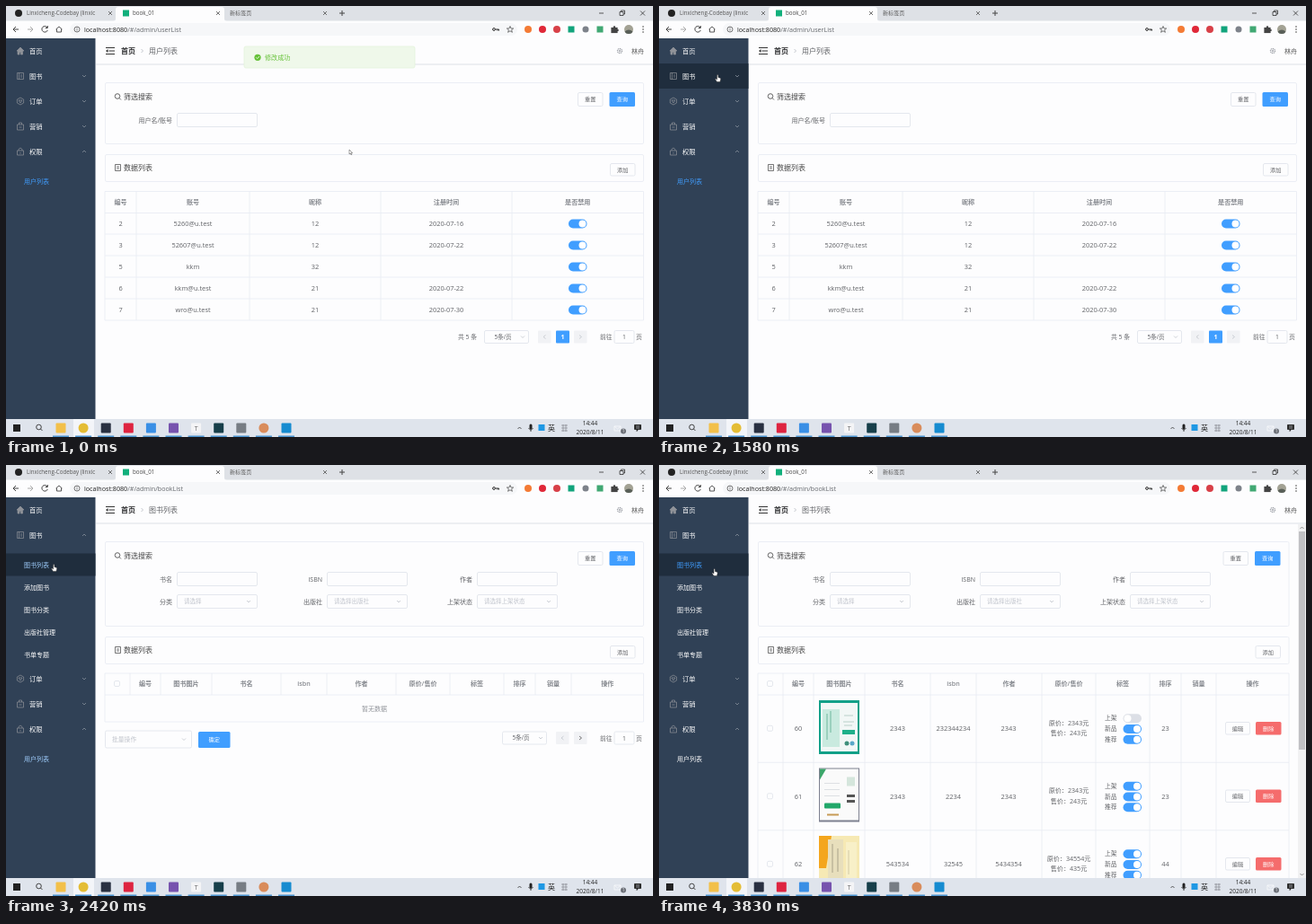
These frames come from a looping animation (720 px wide and 480 px high, 3910 ms). An HTML page:

```html
<!DOCTYPE html>
<html lang="zh">
<head>
<meta charset="utf-8">
<title>用户列表</title>
<style>
html, body { margin: 0; width: 100%; height: 100%; overflow: hidden; background: #fdfdfe; }
svg { display: block; width: 720px; height: 480px; }
text { font-family: "Open Sans", "Noto Sans CJK SC", "Noto Sans CJK", sans-serif; white-space: pre; }
</style>
</head>
<body>
<svg id="stage" viewBox="0 0 720 480"></svg>
<script>
const LOOP = 3910, PAGE = '#fdfdfe', BAR = '#dee1e6', SIDE = '#304156', HOVER = '#1f2d3d';
const BLUE = '#409eff', LINE = '#e8ebf3', EDGE = '#dfe2ea', INK = '#606266', HINT = '#c0c4cc';

// Drawing helpers; text is placed by its vertical centre.
const rect = (x, y, w, h, fill, extra = '') =>
  `<rect x="${x}" y="${y}" width="${w}" height="${h}" fill="${fill}" ${extra}/>`;
const disc = (x, y, r, fill, extra = '') => `<circle cx="${x}" cy="${y}" r="${r}" fill="${fill}" ${extra}/>`;
const path = (d, stroke = INK, w = 0.8, fill = 'none') =>
  `<path d="${d}" fill="${fill}" stroke="${stroke}" stroke-width="${w}"/>`;
const text = (x, y, s, size = 7, fill = INK, anchor = 'start', extra = '') =>
  `<text x="${x}" y="${y + size * 0.37}" font-size="${size}" fill="${fill}" text-anchor="${anchor}" ${extra}>${s}</text>`;
const mid = (x, y, s, size, fill, extra) => text(x, y, s, size, fill, 'middle', extra);
const group = (id, body, extra = '') => `<g id="${id}" ${extra}>${body}</g>`;
const frame = (x, y, w, h, stroke = EDGE) =>
  rect(x + 0.5, y + 0.5, w - 1, h - 1, 'none', `rx="1.5" stroke="${stroke}" stroke-width=".8"`);
const hline = (x1, x2, y) => path(`M${x1} ${y}H${x2}`, LINE);
const chevron = (x, y, up, color = HINT) => {
  const d = up ? -1 : 1;
  return path(`M${x - 2} ${y - d}l2 ${2 * d}l2 ${-2 * d}`, color);
};
const button = (x, y, w, h, label, fill) =>
  (fill ? rect(x, y, w, h, fill, 'rx="1.5"') : frame(x, y, w, h)) +
  mid(x + w / 2, y + h / 2, label, 6.2, fill ? '#fff' : INK);
const toggle = (x, y, on = true) => rect(x, y - 5, 20.5, 10, on ? BLUE : '#dcdfe6', 'rx="5"') +
  disc(on ? x + 15.5 : x + 5, y, 4, '#fff');
const glass = (x, y, r, color, w = 0.9) =>
  disc(x, y, r, 'none', `stroke="${color}" stroke-width="${w}"`) + path(`M${x + r * 0.7} ${y + r * 0.7}l2 2`, color, w);
const cross = x => path(`M${x - 2} 6l4 4m0 -4l-4 4`, '#555', 0.8);

function browser() {
  const tools = path('M14 26H8m3 -3l-3 3l3 3', '#444', 1) + path('M24 26h6m-3 -3l3 3l-3 3', '#aaa', 1) +
    path('M46 24a3.3 3.3 0 1 0 .3 3M46.300 22v2.500h-2.500', '#444', 1) +
    path('M55.500 26l3.500 -3l3.500 3M56.500 25.500v3.500h5v-3.500', '#444', 0.9) +
    disc(79, 26, 3, 'none', 'stroke="#555" stroke-width=".8"') + path('M79 25.500v2M79 24v.8', '#555', 0.8) +
    disc(543, 26, 1.4, 'none', 'stroke="#333"') + path('M544.500 26h4v1.500m-1.500 -1.500v1.500', '#333', 1) +
    path('M561 22.500l1 2.500h2.700l-2.100 1.700l.8 2.600l-2.400 -1.500l-2.400 1.500l.8 -2.600l-2.100 -1.700h2.700z', '#444', 0.7);
  const addons = disc(581, 26, 4, '#f47b35') + disc(597, 26, 4, '#e02838') + disc(613, 26, 4, '#d84048') +
    rect(625.5, 22.5, 7, 7, '#12a47c') + disc(645, 26, 3.5, '#7d828a') + rect(657.5, 22.5, 7, 7, '#41a873') +
    path('M673.500 24h2.500v-1.500h2v1.500h2.500v2h1v2h-1v2h-7z', '#444', 0.2, '#444') +
    disc(693, 26, 5, '#a3a294') + path('M688.500 28.500q4.500 -4 9 0q-1.500 3 -4.500 2.500q-3 .5 -4.500 -2.500', 'none', 0, '#595f58') +
    [23, 26, 29].map(y => disc(709, y, 0.8, '#444')).join('');
  return rect(0, 0, 720, 17, BAR) + path('M119 17q3 0 3 -3v-10q0 -3 3 -3h115q3 0 3 3v10q0 3 3 3z', 'none', 0, PAGE) +
    rect(0, 16.5, 720, 19.5, PAGE) + rect(71, 19, 498, 14, '#f6f7f9', 'rx="7"') +
    disc(14, 8, 4, '#222') + text(23, 8, 'Linxicheng-Codebay (linxic', 6.2, '#555') + cross(116) +
    rect(130, 4.5, 7, 7, '#12b07c') + text(141, 8, 'book_01', 6.2, '#444') + cross(236) +
    text(249, 8, '新标签页', 6.1, '#555') + cross(355) + path('M374 5v6M371 8h6', '#444', 1) +
    path('M660 8h5M706 5.500l5 5m0 -5l-5 5M683 6.500h4v4h-4zM684.500 6.500v-1.500h4v4h-1.500', '#333', 0.8) +
    tools + addons + text(87, 26, 'localhost:8080<tspan id="route" fill="#65686d"></tspan>', 7.15, '#222');
}

const menuIcons = [
  'M12 50l4 -4l4 4h-1.500v4h-2v-2.500h-1.500v2.500h-2v-4z',
  'M12.500 74.500h7v7h-7zM14.500 74.500v7M16 77h2M16 79h2',
  'M16 102l3.600 2v4l-3.600 2l-3.600 -2v-4zM14 105h4l-2 3z',
  'M12.500 132h7v6h-7zM14.500 132v-2h3v2M14.500 135h3',
  'M12.500 161h7v5h-7zM14 161v-1.500q2 -3 4 0v1.500M16 163v1.500'
];
const menuRow = (label, i, open) => {
  const y = 50 + i * 28;
  return path(menuIcons[i], '#909399', 0.7, i ? 'none' : '#909399') +
    text(26, y, label, 7.3, '#fff', 'start', 'font-weight="500"') +
    (i ? group('arrow' + i, chevron(87, y, open, '#87909c')) : '');
};

function sidebar() {
  const sub = ['图书列表', '添加图书', '图书分类', '出版社管理', '书单专题'].map((s, i) =>
    text(20, 111 + 25 * i, s, 7, '#fff', 'start', i ? '' : 'id="bookItem"')).join('');
  return rect(0, 36, 99.5, 424, SIDE) + rect(0, 64, 99.5, 28, HOVER, 'id="hoverTop"') +
    menuRow('首页', 0) + menuRow('图书', 1) +
    `<clipPath id="fold"><rect id="foldBox" x="0" y="92" width="100" height="0"/></clipPath>` +
    group('submenu', rect(0, 98.5, 99.5, 25, HOVER, 'id="hoverSub"') + sub, 'clip-path="url(#fold)"') +
    group('lower', menuRow('订单', 2) + menuRow('营销', 3) + menuRow('权限', 4, true) +
      text(20, 195, '用户列表', 7, BLUE, 'start', 'id="userItem"'));
}

function header() {
  return rect(100, 64.5, 620, 1, '#dde1e8') +
    path('M111 46.500h10M114.500 50h6.500M111 53.500h10', '#333', 1.2) + path('M113.500 48v4l-2.500 -2z', 'none', 0, '#333') +
    text(128, 50, '首页', 8, '#303133', 'start', 'font-weight="700"') + path('M150.500 48l2 2l-2 2', '#b4b8c0') +
    text(159, 50, '', 8, INK, 'start', 'id="crumb"') +
    disc(683, 50, 2.5, 'none', 'stroke="#a3a6ad" stroke-width="1.400" stroke-dasharray="1.3 .6"') + disc(683, 50, 1, '#a3a6ad') +
    text(696, 50, '林舟', 7, '#555');
}

// Search card, list card and their buttons; r is the right edge.
const cards = (r, bottom) => frame(110, 85, r - 110, bottom - 85, LINE) + glass(124, 100.5, 2.8, '#555') +
  text(131, 101.5, '筛选搜索', 8, '#444') + button(r - 74, 96, 28.5, 16, '重置') + button(r - 38.5, 96, 28.5, 16, '查询', BLUE) +
  frame(110, bottom + 11, r - 110, 31, LINE) + path(`M121.500 ${bottom + 22.5}h6v7h-6zM123 ${bottom + 25}h3M123 ${bottom + 27}h3`, '#555') +
  text(131, bottom + 26.5, '数据列表', 8, '#444') + button(r - 38, bottom + 21, 28.5, 14.5, '添加');

const field = (x, y, label, hint) => text(x - 5, y, label, 7, INK, 'end') + frame(x, y - 8, 90, 16) +
  (hint ? text(x + 8, y, hint, 6.5, HINT) + chevron(x + 80, y) : '');

const grid = (edges, y, bottom, labels) => {
  const last = edges[edges.length - 1];
  return hline(110, last, y) + hline(110, last, y + 24) +
    edges.map(x => path(`M${x} ${y}V${bottom}`, LINE)).join('') +
    labels.map((s, i) => s && mid((edges[i] + edges[i + 1]) / 2, y + 11.5, s, 7.1, '#85888e', 'font-weight="600"')).join('');
};

const pager = (y, selX, page) => frame(selX, y - 7.5, 50, 15) + mid(selX + 21, y, '5条/页', 6.5) + chevron(selX + 43, y) +
  (page ? text(503, y, '共 5 条', 6.8) + rect(612, y - 7, 15, 14, BLUE, 'rx="1"') + mid(619.5, y, '1', 7, '#fff', 'font-weight="700"') : '') +
  [page ? 592 : 612, 632].map((x, i) => rect(x, y - 7, 14.5, 14, '#f1f2f5', 'rx="1"') +
    path(i ? `M${x + 6} ${y - 2}l2.500 2l-2.500 2` : `M${x + 8.5} ${y - 2}l-2.500 2l2.500 2`, i && !page ? '#555' : HINT)).join('') +
  text(661, y, '前往', 6.8) + frame(676.5, y - 7.5, 23, 15) + mid(688, y, '1', 6.8) + text(701, y, '页', 6.8);

function userPage() {
  const edges = [110, 145, 271, 417, 563, 709.5];
  const rows = [
    [2, '5260@u.test', 12, '2020-07-16'], [3, '52607@u.test', 12, '2020-07-22'], [5, 'kkm', 32, ''],
    [6, 'kkm@u.test', 21, '2020-07-22'], [7, 'wro@u.test', 21, '2020-07-30']
  ];
  return cards(710, 154) + field(190, 127, '用户名/账号') +
    grid(edges, 206.5, 350, ['编号', '账号', '昵称', '注册时间', '是否禁用']) +
    rows.map((row, r) => {
      const y = 242 + r * 24;
      return row.map((s, i) => mid((edges[i] + edges[i + 1]) / 2, y, s, 7.4)).join('') +
        toggle(626, y + 0.5) + hline(110, 709.5, y + 12);
    }).join('') + pager(368.5, 532, true);
}

const labels = ['', '编号', '图书图片', '书名', 'isbn', '作者', '原价/售价', '标签', '排序', '销量', '操作'];
const checkbox = y => frame(120, y - 3.5, 7, 7);
const filters = () => field(190, 127, '书名') + field(357, 127, 'ISBN') + field(524, 127, '作者') +
  field(190, 152, '分类', '请选择') + field(357, 152, '出版社', '请选择出版社') + field(524, 152, '上架状态', '请选择上架状态');

function emptyPage() {
  return cards(710, 180) + filters() +
    grid([110, 138, 172, 229, 306, 357, 434, 494, 554, 589, 629, 709.5], 232, 256, labels) + checkbox(243.5) +
    path('M110 256V286H709.500V256', LINE) + mid(410, 271, '暂无数据', 7, '#909399') +
    frame(110, 295.5, 97, 20) + text(118, 305.5, '批量操作', 6.8, HINT) + chevron(198, 305.5) +
    button(214, 297, 35.5, 18, '确定', BLUE) + pager(304, 552, false);
}

const covers = [
  y => rect(178, y, 45, 60, '#12a088') + rect(180, y + 3, 41, 54, '#f2f7f6') + rect(182, y + 10, 19, 42, '#c9eadf') +
    path(`M187 ${y + 15}v29M191 ${y + 12}v24`, '#7cbfa8', 1.2) + rect(204, y + 33, 14, 5, '#1fb08a') +
    path(`M206 ${y + 17}h10M205 ${y + 24}h12M206 ${y + 28}h9`, '#a9c4bd') +
    disc(209, y + 48, 2.5, '#3f8f7a') + disc(215, y + 48, 2.5, '#5aa7c8'),
  y => rect(178, y, 45, 60, '#7d8090') + rect(179, y + 1, 43, 57, '#fafafa') + path(`M179 ${y + 1}h7l-7 12z`, 'none', 0, '#3ca66a') +
    rect(184, y + 39, 18, 6, '#22a86a', 'rx="1"') + path(`M184 ${y + 17}h17M184 ${y + 24}h17M184 ${y + 31}h17`, '#d6dadd') +
    path(`M209 ${y + 31}h9M209 ${y + 37}h9`, '#555', 3) + rect(209, y + 10, 9, 10, '#d5e6dc') + path(`M187 ${y + 52}h13`, '#c69b55', 2),
  y => rect(178, y, 45, 60, '#f6e9b4') + path(`M178 ${y}h14l-6 36h-8z`, 'none', 0, '#f4a61d') + rect(188, y + 4, 17, 46, '#e8dfbc') +
    path(`M193 ${y + 9}v32M199 ${y + 14}v26`, '#a9a288', 1) + rect(208, y + 7, 12, 50, '#f8f0c8') + path(`M211 ${y + 16}v27`, '#c9c19c')
];

function bookPage() {
  const edges = [110, 138, 172, 229, 302, 353, 426, 486, 546, 581, 620, 701];
  const rows = [
    [60, 2343, 232344234, 2343, 2343, 243, 23], [61, 2343, 2234, 2343, 2343, 243, 23], [62, 543534, 32545, 5434354, 34554, 435, 44]
  ];
  const body = rows.map(([id, name, isbn, author, price, sale, sort], r) => {
    const y = 293.3 + r * 75.5;
    const cells = [[155, id], [265.5, name], [327.5, isbn], [389, author], [563.5, sort]];
    return checkbox(y) + covers[r](y - 31.3) + cells.map(([x, s]) => mid(x, y, s, 7.4)).join('') +
      mid(456, y - 6, `原价：${price}元`, 7.1) + mid(456, y + 5.5, `售价：${sale}元`, 7.1) +
      ['上架', '新品', '推荐'].map((s, i) => text(496, y - 11.5 + i * 11.7, s, 6.8) +
        toggle(516.5, y - 11 + i * 11.7, r + i > 0)).join('') +
      button(630, y - 7.3, 28, 14.5, '编辑') + button(664, y - 7.3, 28.5, 14.5, '删除', '#f56c6c') + hline(110, 701, y + 38);
  }).join('');
  return cards(701.5, 180) + filters() + grid(edges, 232, 460, labels) + checkbox(243.5) + body +
    rect(711, 66, 9, 394, '#f1f1f2') + rect(712, 74, 7, 243, '#c1c1c4') +
    path('M713.500 71l2 -2l2 2M713.500 455l2 2l2 -2', '#777');
}

function taskbar() {
  const apps = ['#f2c04a', '#e4bd35', '#293041', '#de2440', '#3a8fe5', '#7753ae', '#f4f4f6', '#173f4a', '#777d84', '#d98c5b', '#168bd0'];
  return rect(0, 460, 720, 20, '#dfe4ec') + rect(75, 460, 23, 20, '#f3f5f9') + rect(8, 466, 8, 8, '#222') + glass(36.5, 469, 2.8, '#333') +
    apps.map((c, i) => {
      const x = 61 + i * 25.1;
      return (i === 1 || i === 9 ? disc(x, 470, 5.5, c) : rect(x - 5.5, 464.5, 11, 11, c, 'rx="1"')) +
        rect(x - 9, 478.5, 18, 1.5, '#4a93cf');
    }).join('') + mid(211.6, 470, 'T', 7, '#666') +
    chevron(571.5, 470, true, '#333') + rect(582.5, 465.5, 3, 6, '#222', 'rx="1.5"') + path('M581.500 470q2.500 4 5 0M584 472v2', '#222') +
    rect(592.5, 466, 7, 7, '#1f98e4') + mid(607, 470, '英', 8, '#222') +
    path('M618 467h7M618 470h7M618 473h7M620 466v8M623 466v8', '#777b82', 0.6) +
    mid(650, 465, '14:44', 6.5, '#222') + mid(650, 475, '2020/8/11', 6.5, '#222') +
    path('M677 468h7v5h-7zM677 468l3.500 3l3.500 -3', '#f8f9fb') + disc(687, 473.5, 3, '#6c7078') + mid(687, 473.5, '1', 4.5, '#fff') +
    path('M699.500 466.500h7v5h-3l-1.500 2v-2h-2.500z', '#222', 0.8, '#222') + path('M701 468h4M701 470h4', '#dfe4ec', 0.6);
}

const toast = rect(265, 45, 190, 24, '#eff8ea', 'rx="2" stroke="#e4f3dc" stroke-width=".8"') + disc(280, 57.3, 3.6, '#67c23a') +
  path('M278.300 57.300l1.300 1.300l2.300 -2.500', '#fff') + text(288, 57.5, '修改成功', 7.1, '#67c23a');
const arrow = path('M0 0v5l1.200 -1l.8 1.800l.8 -.4l-.8 -1.700h1.600z', '#444', 0.5, '#fff');
const hand = path('M-1 -3.500q.7 -1 1.400 0v2.500l2.200 .7q.8 .3 .6 1.200l-.7 3h-3.500l-2 -2.800q.3 -1 1.200 -.3l.8 .6z', '#222', 0.5, '#fff');

const stage = document.getElementById('stage');
stage.innerHTML = rect(0, 0, 720, 480, PAGE) + header() + group('users', userPage()) + group('empty', emptyPage()) +
  group('books', bookPage()) + sidebar() + group('toast', toast) + browser() + taskbar() +
  group('arrowCursor', arrow) + group('handCursor', hand);

const $ = id => document.getElementById(id);
const set = (id, name, value) => $(id).setAttribute(name, value);
const show = (id, on) => set(id, 'visibility', on ? 'visible' : 'hidden');
const ramp = (t, from, to) => {
  const p = Math.min(1, Math.max(0, (t - from) / (to - from)));
  return p * p * (3 - 2 * p);
};
const mix = (a, b, p) => `rgb(${a.map((v, i) => Math.round(v + (b[i] - v) * p))})`;
const WHITE = [255, 255, 255], ACTIVE = [64, 158, 255];

// Pointer stops: time, x, y.
const stops = [[0, 382, 160], [170, 382, 160], [580, 56.5, 76.5], [1250, 61, 78], [1580, 65.5, 80.5],
  [1750, 65.5, 80.5], [2000, 53.5, 114.5], [2420, 53.5, 114.5], [2830, 62, 119.5], [LOOP, 62, 119.5]];
function pointer(t) {
  const i = stops.findIndex(s => s[0] > t), [t0, x0, y0] = stops[i - 1], [t1, x1, y1] = stops[i];
  const p = ramp(t, t0, t1);
  return [x0 + (x1 - x0) * p, y0 + (y1 - y0) * p];
}

function snap(t) {
  const mark = k => Math.round(k * 25 / 3) * 10;
  let k = Math.ceil(t * 0.012);
  while (mark(k) > t) k--;
  return k < 2 ? 0 : mark(k);
}

function draw(t) {
  const [x, y] = pointer(t), over = x < 100;
  show('arrowCursor', !over);
  show('handCursor', over);
  set(over ? 'handCursor' : 'arrowCursor', 'transform', `translate(${x} ${y})`);

  const gone = ramp(t, 130, 500);
  set('toast', 'opacity', 1 - gone);
  set('toast', 'transform', `translate(0 ${-24 * gone})`);

  const open = ramp(t, 1620, 1950), picked = ramp(t, 2270, 2570);
  set('foldBox', 'height', 132 * open);
  set('lower', 'transform', `translate(0 ${132 * open})`);
  set('arrow1', 'transform', `translate(0 ${156 * open}) scale(1 ${1 - 2 * open})`);
  set('hoverTop', 'opacity', ramp(t, 580, 880) * (1 - ramp(t, 1830, 2070)));
  set('hoverSub', 'opacity', ramp(t, 1830, 2070));
  set('bookItem', 'fill', mix(WHITE, ACTIVE, picked));
  set('userItem', 'fill', mix(ACTIVE, WHITE, picked));

  const listed = t >= 2330, loaded = t >= 2580;
  show('users', !listed);
  show('empty', listed && !loaded);
  show('books', loaded);
  $('route').textContent = '/#/admin/' + (listed ? 'bookList' : 'userList');
  $('crumb').textContent = listed ? '图书列表' : '用户列表';
}

const start = performance.now();
function tick() {
  draw(snap((performance.now() - start) % LOOP));
  requestAnimationFrame(tick);
}
tick();
</script>
</body>
</html>
```
